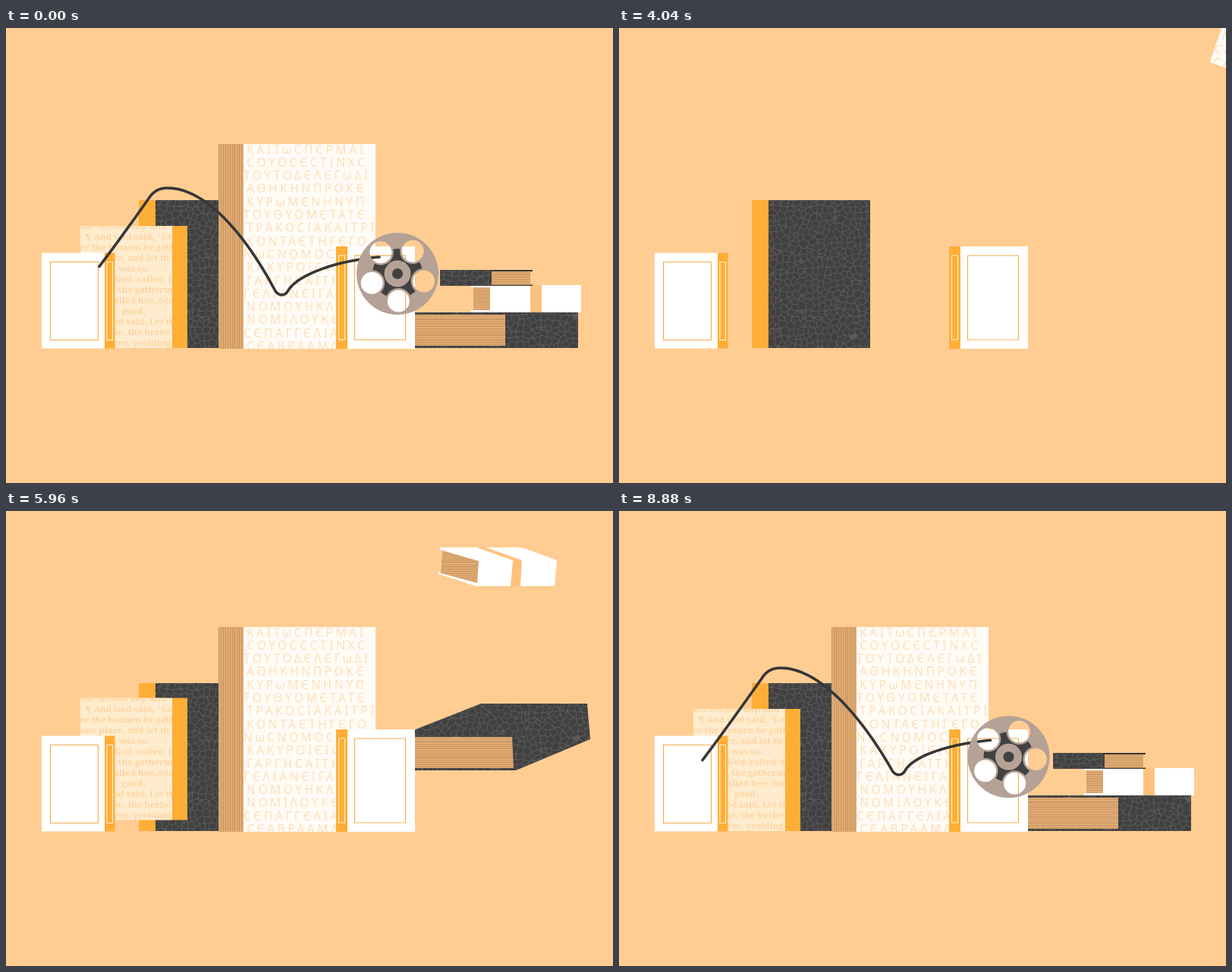
These frames come from a looping animation (800 by 600 pixels, 8920 ms). An HTML page with a canvas:

```html
<!DOCTYPE html>
<html lang="en">
<head>
<meta charset="utf-8">
<title>Bookshelf</title>
<style>
html, body { margin: 0; width: 100%; height: 100%; overflow: hidden; background: #ffcd92; }
canvas { display: block; }
</style>
</head>
<body>
<canvas id="stage" width="800" height="600"></canvas>
<script>
const ctx = document.getElementById('stage').getContext('2d');
const LOOP = 8920, STEP = 40, EXIT = 760;
const BG = '#ffcd92', ORANGE = '#ffae35', DARK = '#363636', BEIGE = '#b5a195';
const rad = Math.PI / 180;

let seed = 7;
const rnd = () => (seed = (seed * 16807) % 2147483647) / 2147483647;

// ---- textures ----
function texture(w, h, shade) {
  const c = document.createElement('canvas');
  c.width = w;
  c.height = h;
  const g = c.getContext('2d'), img = g.createImageData(w, h);
  for (let y = 0; y < h; y++) {
    for (let x = 0; x < w; x++) img.data.set([...shade(x, y), 255], (y * w + x) * 4);
  }
  g.putImageData(img, 0, 0);
  return ctx.createPattern(c, 'repeat');
}

// Leather: borders between jittered cells are lighter.
const CELL = 8, COLS = 20, ROWS = 25;
const seeds = Array.from({ length: COLS * ROWS }, () => [rnd(), rnd()]);
const leather = texture(COLS * CELL, ROWS * CELL, (x, y) => {
  const cx = Math.floor(x / CELL), cy = Math.floor(y / CELL);
  let near = 99, next = 99;
  for (let j = cy - 2; j <= cy + 2; j++) {
    for (let i = cx - 2; i <= cx + 2; i++) {
      const s = seeds[((j + ROWS) % ROWS) * COLS + (i + COLS) % COLS];
      const d = Math.hypot((i + s[0]) * CELL - x, (j + s[1]) * CELL - y);
      if (d < near) { next = near; near = d; } else if (d < next) next = d;
    }
  }
  const v = 65 + 27 * Math.max(0, 1 - (next - near) / 1.5);
  return [v, v, v];
});

const grain = Array.from({ length: 64 }, (_, i) => (i % 3 ? 0.98 : 0.88) + rnd() * 0.06);
const woodTone = i => [222 * grain[i], 168 * grain[i], 112 * grain[i]];
const woodV = texture(64, 1, x => woodTone(x));
const woodH = texture(1, 64, (x, y) => woodTone(y));

// ---- timing ----
const ease = { l: p => p, i: p => p * p, o: p => p * (2 - p), s: p => (1 - Math.cos(Math.PI * p)) / 2 };

// Keys are [time, value, easing into this key].
function at(t, ...keys) {
  if (t <= keys[0][0]) return keys[0][1];
  for (let k = 1; k < keys.length; k++) {
    const [t0, v0] = keys[k - 1], [t1, v1, e = 's'] = keys[k];
    if (t < t1) return v0 + (v1 - v0) * ease[e]((t - t0) / (t1 - t0));
  }
  return keys[keys.length - 1][1];
}

// ---- drawing helpers ----
function rect(fill, x, y, w, h) {
  ctx.fillStyle = fill;
  ctx.fillRect(x, y, w, h);
}

function frame(color, x, y, w, h) {
  ctx.strokeStyle = color;
  ctx.lineWidth = 1.2;
  ctx.strokeRect(x + 0.5, y + 0.5, w, h);
}

function poly(fill, ...pts) {
  ctx.fillStyle = fill;
  ctx.beginPath();
  for (const [x, y] of pts) ctx.lineTo(x, y);
  ctx.fill();
}

function disc(fill, x, y, r) {
  ctx.fillStyle = fill;
  ctx.beginPath();
  ctx.arc(x, y, r, 0, 7);
  ctx.fill();
}

function moved(dx, dy, draw) {
  ctx.save();
  ctx.translate(dx, dy);
  draw();
  ctx.restore();
}

// Tilt about the bottom corner that the book leans on.
function rock(left, right, base, angle, draw) {
  const x = angle < 0 ? left : right;
  ctx.save();
  ctx.translate(x, base);
  ctx.rotate(angle * rad);
  ctx.translate(-x, -base);
  draw();
  ctx.restore();
}

function page(x, y, w, h, draw) {
  ctx.save();
  ctx.beginPath();
  ctx.rect(x, y, w, h);
  ctx.clip();
  draw();
  ctx.restore();
}

// ---- standing books ----
function darkBook(t) {
  const a = at(t, [940, -28], [1440, 0, 'l'], [1860, 33, 'o'], [2100, 0, 'i'], [2280, -10, 'o'],
    [2460, 0, 'i'], [2570, 3, 'o'], [2680, 0, 'i'], [2720, -0.8, 'o'], [2760, 0, 'i']);
  const dx = at(t, [940, -90], [1440, 0, 'l']);
  const dy = at(t, [940, -440], [1440, 0, 'i']);
  const lift = Math.min(1, Math.abs(a) / 10) * -1.5;
  const board = fill => rock(197, 331, 422, a, () => moved(197, 227, () => rect(fill, 0, 0, 134, 195)));
  moved(dx - 22, dy + lift, () => board(ORANGE));
  moved(dx, dy, () => board(leather));
}

const greek = ['ΚΑΙΤωϹΠΕΡΜΑΙ', 'ϹΟΥΟϹΕϹΤΙΝΧϹ', 'ΤΟΥΤΟΔΕΛΕΓωΔΙ', 'ΑΘΗΚΗΝΠΡΟΚΕ', 'ΚΥΡωΜΕΝΗΝΥΠ',
  'ΤΟΥΘΥΟΜΕΤΑΤΕ', 'ΤΡΑΚΟϹΙΑΚΑΙΤΡΙ', 'ΚΟΝΤΑΕΤΗΓΕΓΟ', 'ΝωϹΝΟΜΟϹΟΥ', 'ΚΑΚΥΡΟΙΕΙϹΤΟΚ', 'ΓΑΡΓΗϹΑΙΤΗΝ',
  'ΓΕΛΙΑΝΕΙΓΑΡΕ', 'ΝΟΜΟΥΗΚΛΗ', 'ΝΟΜΙΛΟΥΚΕ', 'ϹΕΠΑΓΓΕΛΙΑϹ', 'ϹΕΑΒΡΑΑΜΔΙ'].map(s => s.replace(/Ε/g, 'Є'));

function greekPage() {
  rect('#fffbf5', 313, 153, 174, 270);
  page(313, 153, 174, 270, () => {
    ctx.fillStyle = '#fddfbb';
    ctx.font = '500 15.5px "Noto Sans", "DejaVu Sans", sans-serif';
    ctx.letterSpacing = '3.6px';
    greek.forEach((s, i) => ctx.fillText(s, 317 - (i % 3 === 2 ? 4 : 0), 165.5 + i * 17.3));
    ctx.letterSpacing = '0px';
  });
}

function greekBook(t) {
  const a = at(t, [4000, 21], [4040, 19, 'l'], [4560, -23, 'o'], [4680, -14.2, 'i'], [4800, 0, 'l'],
    [4910, 5, 'o'], [5020, 0, 'i'], [5090, -1.5, 'o'], [5160, 0, 'i']);
  const dx = at(t, [4000, 500], [4040, 456, 'l'], [4460, 0, 'l']);
  const dy = at(t, [4000, -390], [4040, -321, 'l'], [4460, 0, 'l']);
  const depth = at(t, [4040, 0], [4460, 33]);
  moved(dx - depth, dy, () => rock(313, 487, 423, a, () =>
    moved(313, 153, () => rect(woodV, 0, 0, at(t, [4040, 170], [4460, 190]), 270))));
  moved(dx, dy, () => rock(313, 487, 423, a, greekPage));
}

const verse = [[98, 'the second day, and'], [105, '¶ And God said, “Let'], [97, 'er the heauen be gath'],
  [98, 'one place, and let th'], [148, 'was so.'], [143, 'God  called  the'], [148, 'the gatherun'],
  [142, 'alled hee, Seas'], [152, 'good.'], [141, 'od said, Let the'], [142, 'se, the herbe ye'], [142, 'ree, yeelding fr']];

function verseBook(t) {
  const dy = at(t, [5480, -430], [5840, 0, 'i'], [5960, -14.5, 'o'], [6080, 0, 'i'], [6130, -3, 'o'], [6180, 0, 'i']);
  moved(0, dy, () => {
    rect('#ffeccf', 98, 261, 121, 161);
    page(98, 261, 121, 161, () => {
      ctx.fillStyle = '#fdd5a0';
      ctx.font = '700 11.5px "Noto Serif", "Liberation Serif", serif';
      verse.forEach(([x, s], i) => ctx.fillText(s, x, 265 + i * 14));
    });
    rect(ORANGE, 219, 261, 20, 161);
  });
}

function whiteLeft(t) {
  const dx = at(t, [2960, -160], [3280, 0, 'o']);
  const a = at(t, [2960, 0], [3200, -7, 'o'], [3300, 0, 'i'], [3420, 8, 'o'], [3540, 0, 'i'], [3600, -2, 'o'], [3660, 0, 'i']);
  moved(dx, 0, () => rock(47, 143, 423, a, () => {
    rect('#fff', 47, 296.5, 83, 126);
    rect(ORANGE, 130, 296.5, 13.5, 126);
    frame('#f3b052', 58, 308, 63, 103);
    frame('#fff0d4', 132.5, 308, 7.5, 103);
  }));
}

function whiteRight(t) {
  const dx = at(t, [2780, -560], [3200, 0, 'o']);
  const a = at(t, [2780, 0], [3160, 0], [3340, 22.6, 'o'], [3480, 0, 'i'], [3570, -5, 'o'], [3660, 0, 'i']);
  moved(dx, 0, () => rock(435, 539, 423, a, () => {
    rect(ORANGE, 435, 288, 15, 135);
    rect('#fff', 450, 288, 89, 135);
    frame('#f3b052', 459, 299.5, 67, 111);
    frame('#fff0d4', 438, 299.5, 8, 111);
  }));
}

// ---- lying books: p = 1 is seen from above, p = 0 is flat ----
function bigFlat(t) {
  const dy = at(t, [5580, -440], [5960, -80, 'i'], [6010, 0, 'l'], [6070, -7, 'o'], [6130, 0, 'i']);
  const p = at(t, [5960, 1], [6060, 0]);
  moved(0, dy, () => {
    poly(leather, [522, 375], [522 + 104 * p, 375 - 41 * p], [754 + 12 * p, 375 - 41 * p],
      [754 + 16 * p, 422 - 41 * p], [658 + 14 * p, 422], [522, 422]);
    poly(woodH, [522, 378], [658 + 9 * p, 378], [658 + 11 * p, 419], [522, 419]);
  });
}

function whiteFlat(t) {
  const dy = at(t, [5880, -420], [5960, -274, 'l'], [6160, 0, 'l'], [6230, -8, 'o'], [6300, 0, 'i']);
  const p = at(t, [5960, 1], [6200, 0]);
  const woodTop = [616 - 41 * p, 342 - 16 * p], woodBottom = [616 - 43 * p, 372 - 16 * p];
  moved(0, dy, () => {
    poly('#fff', [613 - 41 * p, 339 - 17 * p], [758 - 78 * p, 339 - 17 * p], [758 - 32 * p, 339],
      [758 - 35 * p, 375 - 2 * p], [638 - 19 * p, 375 - 2 * p], [613 - 43 * p, 375 - 18 * p],
      [613 - 43 * p, 372 - 18 * p], woodBottom, woodTop, [613 - 41 * p, 342 - 17 * p]);
    poly(woodH, woodTop, [638 - 15 * p, 342 - 2 * p], [638 - 17 * p, 372 - 3 * p], woodBottom);
    poly('#ffc27c', [691 - 71 * p, 339 - 17 * p], [706 - 74 * p, 339 - 17 * p], [706 - 26 * p, 339],
      [706 - 28 * p, 375 - 2 * p], [691 - 26 * p, 375 - 2 * p], [691 - 23 * p, 339]);
  });
}

function smallFlat(t) {
  const dy = at(t, [6180, -360], [6520, 0, 'i'], [6600, -9, 'o'], [6680, 0, 'i'], [6720, -2, 'o'], [6760, 0, 'i']);
  moved(572, 319 + dy, () => {
    rect(leather, 0, 0, 68, 21);
    rect(DARK, 68, 0, 54, 2);
    rect(DARK, 68, 19.5, 54, 1.5);
    rect(woodH, 68, 2, 51, 17.5);
  });
}

// ---- impact dust ----
function dust(t, start, x, y) {
  const q = (t - start) / 180;
  if (q <= 0 || q >= 2) return;
  const go = q * (1.3 - 0.3 * q), size = Math.min(1, q, 2 - q);
  ctx.strokeStyle = '#fff';
  ctx.lineCap = ctx.lineJoin = 'round';
  ctx.lineWidth = 3.5 * size;
  ctx.beginPath();
  ctx.arc(x + 68 * go, y - 53 * go, 11.3 * size, 0, 7);
  ctx.stroke();
  moved(x + 42 * go, y - 15 * go, () => {
    ctx.scale(size, size);
    ctx.beginPath();
    ctx.moveTo(-7, 0);
    ctx.bezierCurveTo(-1, 2, 0, 4, 3, 3);
    ctx.quadraticCurveTo(6, 1, 7, -4);
    ctx.stroke();
  });
}

// ---- film and reel ----
function filmPath(s) {
  const y0 = 462 - 0.1 * s * s, v = 1.3 * s;
  const segs = [
    [-120, y0 + 20, -80, y0 + 14, -40, y0 + 6, 0, y0],
    [0, y0, 70, y0 - 74, 130, 307 - s, 188, 225 - s],
    [188, 225 - s, 193, 217 - s, 200, 211 - s, 213, 211 - s],
    [213, 211 - s, 270, 211 - s, 325 + v * 0.6, 290 - s, 354 + v, 345 - s],
    [354 + v, 345 - s, 358 + v, 353 - s, 367 + v, 355 - s, 372 + v, 346 - s],
    [372 + v, 346 - s, 382 + v, 329 - s, 425 + v * 0.5, 308, 492, 302]
  ];
  const pts = [];
  for (const b of segs) {
    for (let i = 0; i <= 24; i++) {
      const u = i / 24, w = 1 - u;
      const mix = k => w * w * w * b[k] + 3 * w * w * u * b[k + 2] + 3 * w * u * u * b[k + 4] + u * u * u * b[k + 6];
      pts.push([mix(0), mix(1)]);
    }
  }
  return pts;
}

function pointAt(pts, x) {
  const i = pts.findIndex(p => p[0] >= x);
  if (i < 0) return pts[pts.length - 1];
  if (i === 0) return pts[0];
  const [a, b] = [pts[i - 1], pts[i]];
  return [x, a[1] + (b[1] - a[1]) * (x - a[0]) / (b[0] - a[0])];
}

function reel(x, y, turn) {
  const circles = (r, holes) => {
    ctx.beginPath();
    ctx.arc(x, y, r, 0, 7);
    for (let i = 0; i < 5; i++) {
      const a = (turn + i * 72) * rad;
      const hx = x + 36 * Math.cos(a), hy = y + 36 * Math.sin(a);
      ctx.moveTo(hx + holes, hy);
      ctx.arc(hx, hy, holes, 0, 7);
    }
  };
  ctx.fillStyle = BEIGE;
  circles(54, 14.5);
  ctx.fill('evenodd');
  // Dark lobes: what the rims of the holes leave of a disc.
  ctx.save();
  circles(60, 17);
  ctx.clip('evenodd');
  disc('#414141', x, y, 33);
  ctx.restore();
  disc(BEIGE, x, y, 17.5);
  disc('#414141', x, y, 7);
}

function film(t, spin) {
  if (t < 7400) return;
  const sag = 67 * (1 - Math.exp((t - LOOP) / 640));
  const pts = filmPath(sag);
  const x = at(t, [7400, -60], [8600, 437, 'l'], [8880, 513.5, 'o'], [LOOP, 516.5, 'l']);
  const tail = at(t, [8640, -120], [8680, 0, 'l'], [8880, 110, 'l'], [LOOP, 123, 'l']);
  const end = pointAt(pts, x - 24);
  const run = [pointAt(pts, tail), ...pts.filter(p => p[0] > tail && p[0] < end[0]), end];
  ctx.strokeStyle = DARK;
  ctx.lineWidth = 3.6;
  ctx.lineCap = ctx.lineJoin = 'round';
  ctx.beginPath();
  for (const p of run) ctx.lineTo(...p);
  ctx.stroke();
  reel(end[0] + 24, end[1] + 22, 160 + (t - LOOP + spin) * 0.275);
}

function scene(t, spin) {
  darkBook(t);
  dust(t, 2100, 335, 420);
  greekBook(t);
  dust(t, 4500, 391, 418);
  verseBook(t);
  bigFlat(t);
  whiteFlat(t);
  smallFlat(t);
  whiteLeft(t);
  whiteRight(t);
  film(t, spin);
}

function draw(now) {
  const time = now % LOOP, t = time - time % STEP;
  rect(BG, 0, 0, 800, 600);
  if (t < EXIT) moved(760 * ease.i(t / EXIT), 0, () => scene(LOOP, t));
  else scene(t, 0);
}

const begin = performance.now();
function tick() {
  draw(performance.now() - begin);
  requestAnimationFrame(tick);
}
tick();
</script>
</body>
</html>
```
